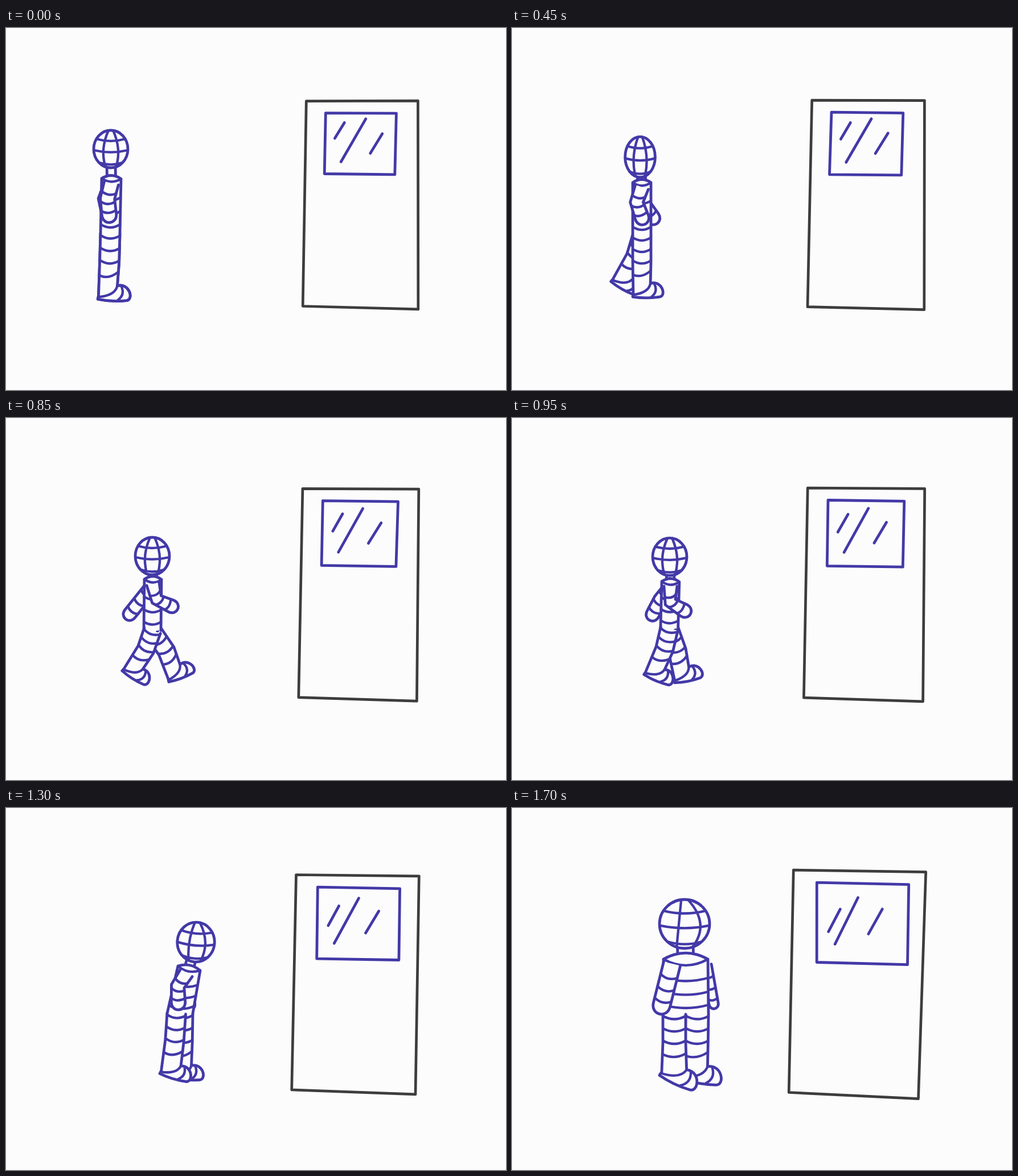
Animation of 878 by 637 pixels, one loop 1.75 s. Source, as an HTML page:

```html
<!DOCTYPE html>
<html lang="en">
<head>
<meta charset="utf-8">
<title>Walk to the door</title>
<style>
html, body { margin: 0; width: 100%; height: 100%; overflow: hidden; background: #fcfcfc; }
svg { display: block; width: 100%; height: 100%; }
path, ellipse { fill: none; stroke: #4339a7; stroke-width: 4.8; stroke-linecap: round; stroke-linejoin: round; }
.solid { fill: #fcfcfc; }
.door { stroke: #3d3c3e; stroke-width: 4.7; }
.ring { stroke-width: 4.3; }
</style>
</head>
<body>
<svg id="stage" viewBox="0 0 878 637"></svg>
<script>
const LOOP = 1750, STEP = 50, END = LOOP - STEP, TURN = 1100;
const stage = document.getElementById('stage');

// time, limb girth, then x y of: head, chest, hip, near ankle, far ankle, near hand, far hand
const poses = [
  [0, 34, 184, 213, 185, 265, 183, 362, 179, 462, 179, 462, 181, 328, 181, 328],
  [250, 25, 204, 215, 206, 263, 200, 366, 226, 460, 174, 444, 168, 321, 240, 318],
  [450, 32, 225, 227, 228, 272, 228, 366, 228, 458, 195, 441, 228, 333, 247, 333],
  [850, 30, 257, 243, 258, 284, 257, 374, 224, 441, 295, 446, 290, 331, 218, 344],
  [1100, 32, 307, 246, 309, 294, 305, 365, 293, 449, 302, 453, 320, 350, 292, 345],
  [1500, 33, 360, 226, 334, 270, 306, 358, 287, 466, 317, 468, 285, 333, 349, 344],
  [1700, 40, 303, 204, 305, 266, 305, 363, 285, 462, 323, 462, 263, 346, 354, 344]
];

// The door and its window at the start and end of the slow zoom.
const frame = [[528, 128, 724, 128, 724, 495, 521, 490], [494, 109, 726, 113, 714, 511, 486, 500]];
const pane = [[562, 149, 686, 150, 683, 258, 559, 257], [535, 131, 696, 135, 695, 275, 535, 271]];
const shine = [
  [595, 166, 578, 194, 632, 160, 588, 236, 661, 186, 639, 220],
  [576, 178, 555, 218, 608, 157, 567, 239, 650, 178, 626, 221]
];

const clamp = v => Math.min(1, Math.max(0, v));
const mix = (a, b, k) => a + (b - a) * k;
const mid = (p, q, k = .5) => [mix(p[0], q[0], k), mix(p[1], q[1], k)];
const add = (p, q, k = 1) => [p[0] + q[0] * k, p[1] + q[1] * k];
const dist = (p, q) => Math.hypot(q[0] - p[0], q[1] - p[1]);
const dir = (p, q) => {
  const n = dist(p, q) || 1;
  return [(q[0] - p[0]) / n, (q[1] - p[1]) / n];
};
const perp = ([x, y]) => [-y, x];
const pairs = a => Array.from({ length: a.length >> 1 }, (_, i) => [a[2 * i], a[2 * i + 1]]);
const xy = p => p[0].toFixed(1) + ' ' + p[1].toFixed(1);
const line = (...pts) => 'M' + pts.map(xy).join('L');
const curve = (a, c, b) => `M${xy(a)}Q${xy(c)} ${xy(b)}`;
const path = (d, cls = '') => `<path class="${cls}" d="${d}"/>`;
const along = (e, u) => u < .5 ? mid(e[0], e[1], 2 * u) : mid(e[1], e[2], 2 * u - 1);

function noise(seed) {
  const s = Math.sin(seed * 12.9898) * 43758.5453;
  return 2 * (s - Math.floor(s)) - 1;
}

function poseAt(time) {
  let i = 0;
  while (i < poses.length - 2 && time >= poses[i + 1][0]) i++;
  const [a, b] = [poses[i], poses[i + 1]];
  const k = (time - a[0]) / (b[0] - a[0]);
  return a.map((v, j) => mix(v, b[j], k));
}

// Both edges of a limb around its three joints.
function edges(a, b, c, w) {
  const n1 = perp(dir(a, b)), n2 = perp(dir(b, c)), n = mid(n1, n2);
  const side = s => [add(a, n1, s), add(b, n, s), add(c, n2, s)];
  return [side(w / 2), side(-w / 2)];
}

function rings(left, right, stops) {
  const down = dir(mid(left[0], right[0]), mid(left[2], right[2]));
  return path(stops.map(u => {
    const a = along(left, u), b = along(right, u);
    return curve(a, add(mid(a, b), down, Math.min(11, .32 * dist(a, b))), b);
  }).join(''), 'ring');
}

function arm(shoulder, hand, w, bone = 28) {
  const bend = Math.sqrt(Math.max(0, bone ** 2 - dist(shoulder, hand) ** 2 / 4));
  const elbow = add(mid(shoulder, hand), perp(dir(shoulder, hand)), bend);
  const [o, n] = edges(shoulder, elbow, hand, w);
  const out = dir(elbow, hand), reach = .75 * w;
  const cap = `C${xy(add(o[2], out, reach))} ${xy(add(n[2], out, reach))} ${xy(n[2])}`;
  return path(line(...o) + cap + `L${xy(n[1])}L${xy(n[0])}`, 'solid') +
    rings(o, n, [.3, .6, .88]);
}

function leg(hip, ankle, w, splay) {
  const knee = add(mid(hip, ankle), [.15 * Math.abs(ankle[0] - hip[0]), 0]);
  const [back, front] = edges(hip, knee, ankle, w);
  const shin = dir(knee, ankle), angle = Math.atan2(-shin[0], shin[1]) + splay;
  const cos = Math.cos(angle), sin = Math.sin(angle), size = w / 34;
  const foot = (x, y) => add(ankle, [x * cos - y * sin, x * sin + y * cos], size);
  const heel = foot(-17, 16), sole = foot(33, 16), c1 = foot(37, -16), c2 = foot(47, 14);
  back[2] = foot(-16, 10);
  front[2] = foot(16, -9);
  const outline = line(...back, heel) + `Q${xy(foot(8, 20))} ${xy(sole)}` +
    `C${xy(c2)} ${xy(c1)} ${xy(front[2])}L${xy(front[1])}L${xy(front[0])}`;
  return path(outline, 'solid') + rings(back, front, [.03, .25, .47, .7]) +
    path(curve(front[2], foot(13, 8), foot(-15, 12)) +
      curve(foot(23, -9), foot(31, 6), foot(18, 16)), 'ring');
}

function torso(chest, hip, top, base) {
  const across = perp(dir(hip, chest));
  const [l0, r0, l1, r1] = [add(chest, across, -top / 2), add(chest, across, top / 2),
    add(hip, [-base / 2, 0]), add(hip, [base / 2, 0])];
  const down = dir(chest, hip), rise = Math.max(11, .28 * top);
  return path(line(l1, l0) + `Q${xy(add(chest, down, -rise))} ${xy(r0)}L${xy(r1)}`, 'solid') +
    path(curve(l0, add(chest, down, rise), r0), 'ring') +
    rings([l0, mid(l0, l1), l1], [r0, mid(r0, r1), r1], [.34, .59, .83]);
}

function head(at, rx, ry, tilt, shift) {
  const rim = v => Math.sqrt(1 - v * v);
  const meridian = m => curve([.3 * m * rx, -ry * rim(.3 * m)],
    [(1.4 * m + 2 * shift) * rx, 0], [.7 * m * rx, ry * rim(.7 * m)]);
  const parallel = v => curve([-rx * rim(v), v * ry], [0, (v + .22) * ry], [rx * rim(v), v * ry]);
  const grid = [-.45, .45].map(meridian).join('') + [-.54, .06, .72].map(parallel).join('');
  return `<g transform="translate(${xy(at)}) rotate(${tilt})">` +
    `<ellipse class="solid" rx="${rx}" ry="${ry}"/>${path(grid, 'ring')}</g>`;
}

function door(time) {
  const zoom = (time / END) ** 2.3;
  const blend = ([a, b]) => pairs(a.map((v, i) => mix(v, b[i], zoom) + .7 * noise(time + i)));
  const glints = blend(shine);
  return path(line(...blend(frame)) + 'Z', 'door') + path(line(...blend(pane)) + 'Z') +
    path([0, 2, 4].map(i => line(glints[i], glints[i + 1])).join(''));
}

function figure(time) {
  const [, girth, ...rest] = poseAt(time);
  const [skull, chest, hip, nearAnkle, farAnkle, nearHand, farHand] = pairs(rest);
  const turn = clamp((time - TURN) / (END - TURN)) ** 1.5;
  const away = clamp(2 * turn);
  const squash = Math.sin(Math.PI * clamp(time / 700));
  const spread = away * girth / 2;
  const lean = Math.atan2(chest[0] - hip[0], hip[1] - chest[1]) * 180 / Math.PI;
  const throat = .22 * girth + 5 * turn;
  const neck = [-throat, throat].map(x =>
    line(add(mid(skull, chest, .6), [x, 0]), add(chest, [x, 0]))).join('');
  return arm(add(chest, [37 * turn, 10]), farHand, .75 * girth * (1 - .45 * turn)) +
    leg(add(hip, [spread, 0]), farAnkle, girth, .15 * away) +
    path(neck) +
    torso(chest, hip, girth + 38 * turn, girth * (1 + away)) +
    leg(add(hip, [-spread, 0]), nearAnkle, girth, .45 * away) +
    arm(add(chest, [-24 * turn, 8]), nearHand, .75 * girth) +
    head(skull, 30 - 4 * squash + 14 * turn, 33 + 3 * squash + 10 * turn,
      away * lean, .2 * away);
}

let shown = -1;
const start = performance.now();
function tick() {
  const time = Math.floor((performance.now() - start) % LOOP / STEP) * STEP;
  if (time !== shown) {
    shown = time;
    stage.innerHTML = door(time) + figure(time);
  }
  requestAnimationFrame(tick);
}
tick();
</script>
</body>
</html>
```
